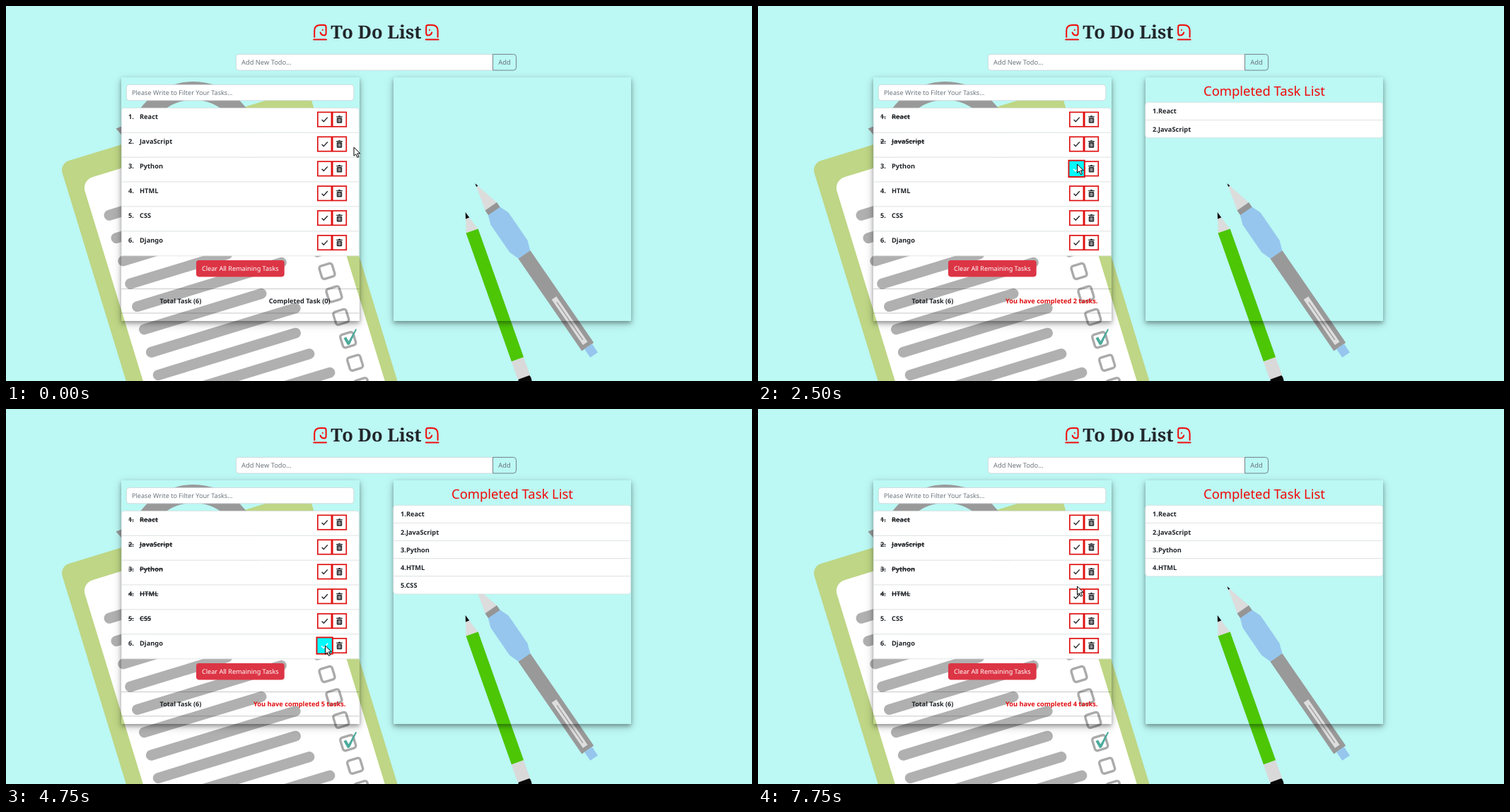
These frames come from a looping animation (1055 by 531 pixels, 8000 ms). An HTML page:

```html
<!DOCTYPE html>
<html lang="en">
<head>
<meta charset="utf-8">
<title>To Do List</title>
<style>
html, body { margin: 0; width: 100%; height: 100%; overflow: hidden; background: #bcf8f4; }
svg { position: absolute; left: 0; top: 0; display: block; }
.panel {
  position: absolute; top: 101px; width: 336.5px; height: 344.5px;
  box-shadow: 0 3px 5.5px rgba(0,0,0,.3), 0 4px 12.5px rgba(0,0,0,.2);
}
text { font-family: "Noto Sans", "Open Sans", sans-serif; font-size: 9.1px; fill: #212529; text-rendering: geometricPrecision; }
.bold { font-weight: 700; font-size: 9.25px; }
.hint { fill: #6c757d; }
.mid { text-anchor: middle; }
.field { fill: #fff; stroke: #ced4da; stroke-width: .8; }
.struck { text-decoration: line-through; }
.red { fill: #e20d10; }
</style>
</head>
<body>
<svg width="1055" height="531" viewBox="0 0 1055 531">
  <g id="board" transform="translate(75.6 223) rotate(-17)">
    <rect width="367" height="520" rx="14" fill="#bed685"/>
    <rect x="23" y="32" width="327" height="480" rx="16" fill="#fff"/>
  </g>
  <g fill="#999">
    <circle cx="265" cy="200" r="80" fill="none" stroke="#999" stroke-width="26"/>
    <path d="M155.5 173.5L170 168V190Z"/>
  </g>
  <path d="M477.5 470.5L481 468.5L484.5 474.5L494.5 457L496 458L486 479.5L483 480Z" fill="#4cab9c"/>
  <g id="pen" transform="translate(664 252) rotate(-34.5)">
    <path d="M0 0L10 39H-10Z" fill="#dcdcdc"/>
    <path d="M0 -1L1.4 4H-1.4Z" fill="#111"/>
    <rect x="-10" y="38.5" width="20" height="10" fill="#959595"/>
    <rect x="-10" y="121" width="20.5" height="159" fill="#999"/>
    <path d="M-10 47H10L15 60V107L10 121H-9.5L-14.5 107V60Z" fill="#96c6ee" stroke="#96c6ee" stroke-linejoin="round"/>
    <rect x="-4" y="196" width="8" height="78" fill="#dedede"/>
    <path d="M0 203V268" stroke="#999" stroke-width="1.2"/>
    <rect x="-5.5" y="280" width="13" height="14.5" fill="#96c6ee"/>
  </g>
  <g id="pencil" transform="translate(650 293) rotate(-19.5)">
    <path d="M0 0L8.8 27H-8.8Z" fill="#dcdcdc"/>
    <path d="M0 -1L2.8 8H-2.8Z" fill="#111"/>
    <rect x="-9.2" y="246" width="18.4" height="11" rx="4" fill="#080808"/>
    <rect x="-9" y="27" width="18.2" height="193" fill="#4cc605"/>
    <rect x="-9.2" y="220" width="18.4" height="27" fill="#d9d9d9"/>
  </g>
</svg>
<div class="panel" style="left:163px"></div>
<div class="panel" style="left:547.5px"></div>
<svg width="1055" height="531" viewBox="0 0 1055 531">
  <defs>
    <g id="knight" fill="none" stroke="#f00a0a" stroke-width="2" stroke-linecap="round" stroke-linejoin="round">
      <path d="M436.2 44V35Q436.2 27 444.5 27H450Q452.6 27 452.6 29.5V38.5Q452.6 41.5 450 41.5Q445.5 41.3 444.6 37.5M435.2 47.6H453"/>
      <circle cx="447.8" cy="34" r=".5" stroke-width="1.2"/>
    </g>
    <g id="trash" fill="#212529">
      <path d="M-4.3 -4.4H-1.6L-1 -5.3H1L1.6 -4.4H4.3V-3.1H-4.3Z"/>
      <rect x="-3.7" y="-2.4" width="7.4" height="7.6" rx="1.2"/>
      <path d="M-1.6 -1V3.8M0 -1V3.8M1.6 -1V3.8" stroke="#fff" stroke-width=".7"/>
    </g>
  </defs>
  <use href="#knight"/>
  <use href="#knight" transform="translate(1046.8 0) scale(-1 1)"/>
  <text class="mid" x="523.5" y="45.5" style="font:700 25.5px 'Noto Serif',serif">To Do List</text>

  <path class="field" d="M688.5 68.4H329.4q-4 0 -4 4V87q0 4 4 4H688.5Z"/>
  <text class="hint" x="333" y="83.2" style="font-size:9.3px">Add New Todo...</text>
  <path d="M688.5 68.4H717.5q4 0 4 4V87q0 4 -4 4H688.5Z" fill="none" stroke="#6c757d" stroke-width=".9"/>
  <text class="hint mid" x="705" y="83.2" style="font-size:9.4px">Add</text>

  <rect class="field" x="170.4" y="111.4" width="321.4" height="22.4" rx="4"/>
  <text class="hint" x="178" y="126.2">Please Write to Filter Your Tasks...</text>

  <g id="tasks"></g>
  <rect x="269" y="360" width="124.7" height="23.4" rx="3.8" fill="#dc3545"/>
  <text class="mid" x="331.3" y="375.2" style="fill:#fff">Clear All Remaining Tasks</text>
  <path d="M163 400.6H499.5M163 434.9H499.5" stroke="#000" stroke-opacity=".25" stroke-width=".9"/>
  <text class="bold mid" x="247" y="421.3" style="font-size:9.1px">Total Task (6)</text>
  <text class="bold mid" id="status" x="415.2" y="421.3"></text>

  <text class="mid" id="title" x="716" y="127.3" style="font-size:18.4px;font-weight:500;fill:#f00808">Completed Task List</text>
  <g id="finished"></g>
  <path id="cursor" d="M0 0V12.2L2.8 9.6L4.9 14.4L7 13.5L4.9 8.8H8.8Z" fill="#fff" stroke="#000" stroke-linejoin="round"/>
</svg>
<script>
const NAMES = ["React", "JavaScript", "Python", "HTML", "CSS", "Django"];
const LOOP = 8000, TICK = 250;
const ROW = 34.9, DONE_ROW = 25.1, FIRST_MID = 160.6;

// The pointer's height at key times (s), counted in task rows.
const PATH = [
  [0, 2.13], [1, 1.3], [1.5, 1.3], [2, 2], [2.25, 2], [2.5, 2.82], [3, 2.9],
  [3.5, 4], [3.75, 4.85], [4.25, 4.9], [4.75, 6], [6.5, 6], [7, 5], [7.25, 5], [7.75, 3.59]
];
// Clicks that tick a task, then clicks that untick one.
const CHECKS = [1.5, 2.5, 3, 3.75, 4.25, 5.25];
const UNCHECKS = [6.5, 7.25];

const $ = id => document.getElementById(id);
const mix = (a, b, k) => a + (b - a) * k;

function add(parent, tag, attrs = {}, text = "") {
  const el = document.createElementNS("http://www.w3.org/2000/svg", tag);
  for (const key in attrs) el.setAttribute(key, attrs[key]);
  el.textContent = text;
  return parent.appendChild(el);
}

function drawPaper() {
  for (let i = 0; i < 10; i++) {
    // Long and short lines alternate, growing towards the bottom.
    const len = i % 2 ? 173 + (i - 5) * 15 : 213;
    add($("board"), "path", {
      d: `M46 ${90.7 + i * 33.8}h${len}`, stroke: "#b0b0b0", "stroke-width": 15, "stroke-linecap": "round"
    });
  }
  for (let i = 0; i < 7; i++) {
    add($("board"), "rect", {
      x: 307.8, y: 213.1 + i * 33.9, width: 19, height: 19, rx: 3.5,
      fill: "#fff", stroke: "#aaa", "stroke-width": 3.4
    });
  }
}

function rowPath(x, y, w, h, top, bottom) {
  const a = top ? 4 : 0, b = bottom ? 4 : 0;
  return `M${x} ${y + a}q0 ${-a} ${a} ${-a}H${x + w - a}q${a} 0 ${a} ${a}` +
    `V${y + h - b}q0 ${b} ${-b} ${b}H${x + b}q${-b} 0 ${-b} ${-b}Z`;
}

const rowStyle = { fill: "#fff", stroke: "#dadedf", "stroke-width": .7 };
const buttonStyle = { x: -9.8, y: -10.2, width: 19.6, height: 20.4, fill: "#fff", stroke: "#df1212", "stroke-width": 1.7 };

function makeTask(name, i) {
  const mid = FIRST_MID + i * ROW, y = mid - 16.2;
  const g = add($("tasks"), "g");
  add(g, "path", { ...rowStyle, d: rowPath(163.4, y, 335.8, ROW, i === 0, false) });
  const labels = [
    add(g, "text", { x: 173, y: y + 16 }, i + 1 + "."),
    add(g, "text", { x: 189, y: y + 16 }, name)
  ];
  const bin = add(g, "g", { transform: `translate(471.5 ${mid})` });
  add(bin, "rect", buttonStyle);
  add(bin, "use", { href: "#trash" });
  const check = add(g, "g");
  const box = add(check, "rect", buttonStyle);
  const tick = add(check, "path", { d: "M-4 .4L-1.3 3.1L4.2 -3", fill: "none", "stroke-width": 1.35 });
  return { labels, check, box, tick, mid };
}

function makeFinished(name, i) {
  const y = 136.4 + i * DONE_ROW;
  const g = add($("finished"), "g");
  const path = add(g, "path", rowStyle);
  add(g, "text", { class: "bold", x: 558, y: y + 16 }, `${i + 1}.${name}`);
  return { g, path, y };
}

drawPaper();
const tasks = NAMES.map(makeTask);
const finished = NAMES.map(makeFinished);

function rowAt(s) {
  const next = PATH.findIndex(([time]) => time > s);
  if (next < 0) return PATH.at(-1)[1];
  const [t0, r0] = PATH[next - 1], [t1, r1] = PATH[next];
  return mix(r0, r1, (s - t0) / (t1 - t0));
}

function statusText(n) {
  if (!n) return "Completed Task (0)";
  return n === 1 ? "You have completed 1task." : `You have completed ${n} tasks.`;
}

function render(t) {
  const s = Math.floor(t / TICK) * TICK / 1000;
  const past = times => times.filter(time => time <= s).length;
  const done = past(CHECKS) - past(UNCHECKS);
  const row = rowAt(s);
  const x = mix(492, 451.5, Math.min(1, s));
  $("cursor").setAttribute("transform", `translate(${x} ${FIRST_MID + (row - 1) * ROW})`);

  tasks.forEach((task, i) => {
    const on = x < 460 && Math.abs(row - i - 1) < .35;
    for (const label of task.labels) label.setAttribute("class", i < done ? "bold struck" : "bold");
    task.check.setAttribute("transform", `translate(450.6 ${task.mid}) scale(${on ? 1.14 : 1})`);
    task.box.setAttribute("fill", on ? "#00fbff" : "#fff");
    task.tick.setAttribute("stroke", on ? "#fff" : "#212529");
  });

  finished.forEach((item, i) => {
    item.g.setAttribute("visibility", i < done ? "visible" : "hidden");
    item.path.setAttribute("d", rowPath(547.8, item.y, 335.8, DONE_ROW, i === 0, i === done - 1));
  });

  $("title").setAttribute("visibility", done ? "visible" : "hidden");
  $("status").textContent = statusText(done);
  $("status").setAttribute("class", done ? "bold mid red" : "bold mid");
}

const start = performance.now();
function frame() {
  render((performance.now() - start) % LOOP);
  requestAnimationFrame(frame);
}
frame();
</script>
</body>
</html>
```
